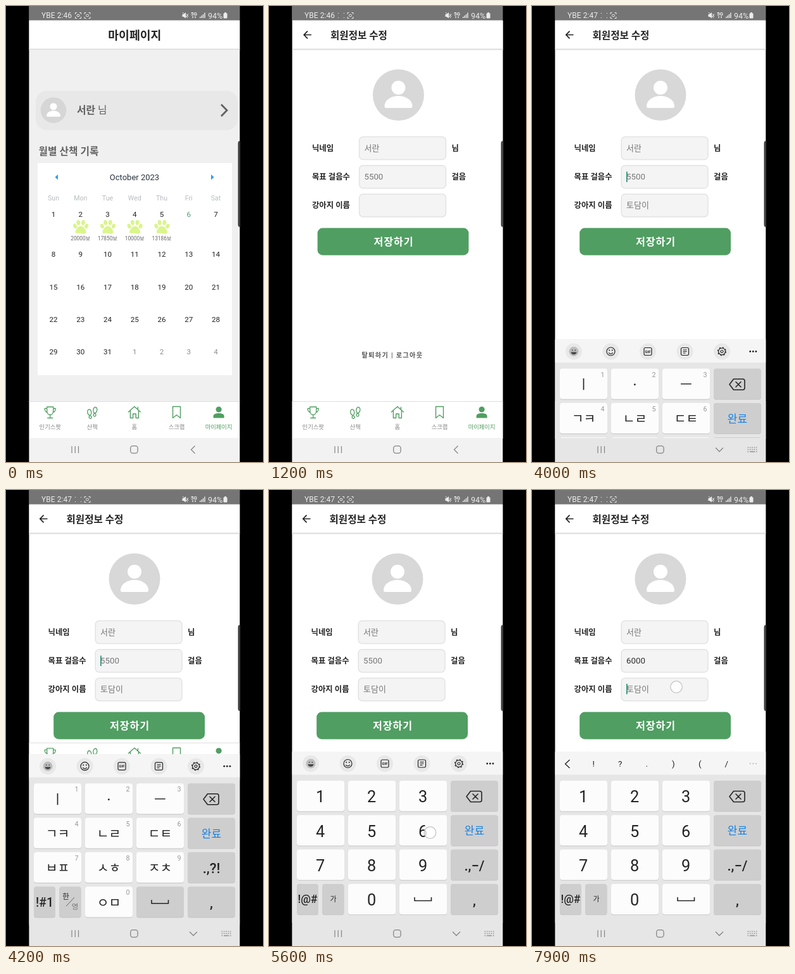
These frames come from a looping animation (406 by 720 pixels, 8000 ms). An HTML page:

```html
<!DOCTYPE html>
<html lang="ko">
<head>
<meta charset="utf-8">
<title>My page</title>
<style>
html, body { margin: 0; width: 100%; height: 100%; overflow: hidden; background: #000; }
svg { display: block; width: 100vw; height: 100vh; }
text { font-family: Roboto, "Noto Sans CJK KR", "Noto Sans CJK", sans-serif; white-space: pre; }
</style>
</head>
<body>
<svg id="stage" viewBox="0 0 406 720" lang="ko"></svg>
<script>
const GREEN = '#509e62', INK = '#242424';
const LOOP = 8000;

// Markup helpers; text y is the vertical centre of the glyphs
const text = (s, x, y, size, fill = INK, more = '') =>
  `<text x="${x}" y="${(y + size * 0.36).toFixed(2)}" font-size="${size}" fill="${fill}" ${more}>${s}</text>`;
const mid = (s, x, y, size, fill, more = '') => text(s, x, y, size, fill, 'text-anchor="middle" ' + more);
const bold = 'font-weight="700"', medium = 'font-weight="500"';
const rect = (x, y, w, h, fill, r = 0, more = '') =>
  `<rect x="${x}" y="${y}" width="${w}" height="${h}" rx="${r}" fill="${fill}" ${more}/>`;
const band = (y, h, fill, more = '') => rect(36.4, y, 333, h, fill, 0, more);
const line = (d, stroke, w = 1.5, more = '') =>
  `<path d="${d}" fill="none" stroke="${stroke}" stroke-width="${w}" ${more}/>`;
const fill = (d, color) => `<path d="${d}" fill="${color}"/>`;
const dot = (x, y, r, color, more = '') => `<circle cx="${x}" cy="${y}" r="${r}" fill="${color}" ${more}/>`;
const group = (id, body) => `<g id="${id}">${body}</g>`;
const at = (x, y, body, k = 1) => `<g transform="translate(${x} ${y}) scale(${k})">${body}</g>`;
const round = 'stroke-linecap="round" stroke-linejoin="round"';

const person = dot(0, -11.5, 11, '#fff') +
  fill('M-22 18C-22 7-10 1.500 0 1.500S22 7 22 18Q22 20.500 19 20.500H-19Q-22 20.500-22 18Z', '#fff');

function header(title, back) {
  const name = back ? text(title, 95.5, 46, 15.6, INK, bold) : mid(title, 203.3, 46, 18.3, INK, bold);
  const arrow = back ? line('M65.500 45.500H54M59.500 39.700L53.800 45.500L59.500 51.300', '#222', 1.7) : '';
  return band(23, 45, '#fff') + band(67, 1, '#ececec') + band(68, 1, '#dcdcdc') + band(69, 1, '#eee') + name + arrow;
}

function paw(x, y) {
  const toe = (dx, dy, tilt) =>
    `<ellipse cx="${dx}" cy="${dy}" rx="2.900" ry="3.900" transform="rotate(${tilt} ${dx} ${dy})"/>`;
  return at(x, y, `<g fill="#daf58c">${toe(-9, -1.5, -22)}${toe(-3.8, -7, -6)}${toe(3.8, -7, 6)}${toe(9, -1.5, 22)}` +
    '<path d="M0-1.500C4-1.500 8.500 4.500 8.500 8C8.500 11.500 4 11 0 10S-8.500 11.500-8.500 8C-8.500 4.500-4-1.500 0-1.500Z"/></g>');
}

function calendar() {
  const colX = i => 75 + i * 42.75;
  const rowY = [329, 392, 443.5, 495, 546];
  let out = rect(50, 248, 307, 335, '#fff') + mid('October 2023', 203, 270.3, 13, '#2b3440') +
    fill('M82 266V274.500L77.500 270.200Z', '#2a9fe8') + fill('M324 266V274.500L328.500 270.200Z', '#2a9fe8');
  ['Sun', 'Mon', 'Tue', 'Wed', 'Thu', 'Fri', 'Sat'].forEach((d, i) => {
    out += mid(d, colX(i), 302.8, 10.6, '#b8bcc0');
  });
  for (let i = 0; i < 35; i++) {
    const next = i > 30, color = next ? '#8e8e8e' : i === 5 ? '#4d9e6c' : INK;
    out += mid(next ? i - 30 : i + 1, colX(i % 7), rowY[Math.floor(i / 7)], 11.6, color);
  }
  [20000, 17850, 10000, 13186].forEach((n, i) => {
    out += paw(colX(i + 1) + 0.4, 349) + mid(n + '보', colX(i + 1), 367.3, 8.3, '#666');
  });
  return out;
}

function myPage() {
  const card = rect(47, 134, 319, 62, '#e8e8e8', 17) + dot(75, 164.5, 20.3, '#d6d6d6') + at(75, 164.5, person, 0.5) +
    text(`<tspan ${bold}>서란</tspan> 님`, 112, 164.5, 15.8, '#606060') +
    line('M340 155.500L349 164.700L340 174', '#626262', 2.8);
  return band(23, 602, '#f0f0f0') + header('마이페이지') + group('card', card) +
    text('월별 산책 기록', 51.5, 229.5, 15.8, '#646464', bold) + calendar();
}

function editPage() {
  let out = band(23, 660, '#fff') + header('회원정보 수정', true) +
    dot(203, 140.5, 40.5, '#d8d8d8') + at(203, 140.5, person);
  [['닉네임', '님'], ['목표 걸음수', '걸음'], ['강아지 이름', '']].forEach(([label, unit], i) => {
    const y = 224.5 + i * 45.2;
    out += text(label, 66.5, y, 12.4, INK, bold) + text(unit, 287, y, 12.4, INK, bold) +
      rect(141.2, y - 18, 136.8, 36, '#f4f4f4', 6, 'stroke="#e3e3e3" stroke-width="1.500"');
  });
  return out + text('서란', 149, 224.5, 13, '#777') +
    text('5500', 149, 269.7, 13.3, '#777', 'id="steps"') +
    text('토담이', 149, 314.7, 13, '#777', 'id="dog"') +
    rect(149, 261.5, 1.7, 16.5, '#2b8f74', 0, 'id="caret"') +
    rect(75.2, 350.6, 238.8, 42.8, GREEN, 8) + mid('저장하기', 195.5, 372.5, 16.2, '#fff', bold + ' letter-spacing=".8"') +
    text('탈퇴하기 | 로그아웃', 145, 551, 10.2, '#555', bold + ' letter-spacing="1.300"');
}

function tabBar() {
  const icons = [
    line('M-5-8.500H5V-2C5 2 2.500 4 0 4S-5 2-5-2ZM-5-6H-8.500C-8.500-2-7-.5-4.500 0M5-6H8.500C8.500-2 7-.5 4.500 0M0 4V8.500M-4 9H4', GREEN, 1.3, round),
    [[-4.5, 0, -8], [4.5, -3.5, 8]].map(([x, y, tilt]) =>
      `<g transform="translate(${x} ${y}) rotate(${tilt})" fill="none" stroke="${GREEN}" stroke-width="1.300">` +
      '<ellipse rx="3" ry="4.600"/><ellipse cx=".3" cy="7.800" rx="2" ry="2.100"/></g>').join(''),
    line('M-9.500-.5L0-9L9.500-.5M-6.500-3V9H-2.300V2.500H2.300V9H6.500V-3M5.500-4.500V-8', GREEN, 1.4, round),
    line('M-6-9H6V9L0 4.300L-6 9Z', GREEN, 1.4, round),
    dot(0, -4.5, 4.6, GREEN) + fill('M-8.500 9V6C-8.500 2.500-4 1.500 0 1.500S8.500 2.500 8.500 6V9Z', GREEN)
  ];
  return band(624, 59, '#fff') + band(624, 1, '#dedede') +
    ['인기스팟', '산책', '홈', '스크랩', '마이페이지'].map((name, i) => {
      const x = 69.7 + i * 66.6;
      return at(x, 641.5, icons[i]) + mid(name, x, 665, 9.3, i === 4 ? GREEN : '#858585');
    }).join('');
}

const colX = [44, 125, 206, 287], rowY = [459, 513.3, 567.6, 622];
function key(x, y, w, grey, label = '') {
  return rect(x, y + 1, w, 48.2, '#c6c6c6', 4) + rect(x, y, w, 48.2, grey ? '#cecece' : '#fcfcfc', 4) + label;
}

function sharedKeys(punct) {
  const erase = line('M318.500 475.500H333Q336 475.500 336 478.500V489.500Q336 492.500 333 492.500H318.500L312 484ZM322 480L330 488M330 480L322 488', INK, 1.6, round);
  return key(287, rowY[0], 75, true, erase) +
    key(287, rowY[1], 75, true, mid('완료', 324.5, 538.3, 17, '#1681e8')) +
    key(287, rowY[2], 75, true, mid(punct, 324.5, 593, 22, INK, medium)) +
    key(287, rowY[3], 75, true, mid(',', 324.5, 648, 22, INK, medium));
}

const space = line('M230 643V648.500H256.500V643', INK, 1.6);

function hangulKeys() {
  const jamo = (s, x, y, n) => key(x, y, 75, false,
    mid(s, x + 37.5, y + 25, 20.5, INK, medium) + mid(n, x + 67.5, y + 9.2, 10.8, '#999'));
  const labels = ['ㅣ', '·', 'ㅡ', 'ㄱㅋ', 'ㄴㄹ', 'ㄷㅌ', 'ㅂㅍ', 'ㅅㅎ', 'ㅈㅊ'];
  return labels.map((s, i) => jamo(s, colX[i % 3], rowY[Math.floor(i / 3)], i + 1)).join('') +
    key(44, rowY[3], 34, true, mid('!#1', 61, 646.5, 19.5, INK, medium)) +
    key(84, rowY[3], 34.5, true, mid('한', 94.5, 637.5, 11.5, INK) + mid('영', 109, 654, 11.5, '#777') + line('M95 653L108 639', '#666', 1)) +
    jamo('ㅇㅁ', 125, rowY[3], 0) + key(206, rowY[3], 75, true, space) + sharedKeys('.,?!');
}

function numberKeys() {
  let out = '';
  for (let i = 0; i < 9; i++) {
    const x = colX[i % 3], y = rowY[Math.floor(i / 3)];
    out += key(x, y, 75, false, mid(i + 1, x + 37.2, y + 25.3, 25.3, INK));
  }
  return out + key(44, rowY[3], 34, true, mid('!@#', 61, 646, 17.5, INK, medium)) +
    key(84, rowY[3], 34.5, true, mid('가', 101.5, 646, 11, INK)) +
    key(125, rowY[3], 75, false, mid('0', 162.2, 647, 25.3, INK)) +
    key(206, rowY[3], 75, false, space) + sharedKeys('.,−/');
}

function tools() {
  const ring = (r, more = '') => dot(0, 0, r, 'none', `stroke="${INK}" stroke-width="1.200" ${more}`);
  const box = rect(-6, -6, 12, 12, 'none', 2, `stroke="${INK}" stroke-width="1.200"`);
  const eyes = color => dot(-2.3, -2, 1, color) + dot(2.3, -2, 1, color);
  const icons = [
    dot(0, 0, 7.5, '#bcbcbc') + eyes('#555') + fill('M-4.500 1H4.500C4 6-4 6-4.500 1Z', '#444'),
    ring(6.5) + eyes(INK) + line('M-3.300 1.800C-2 4.500 2 4.500 3.300 1.800', INK, 1.2),
    box + mid('GIF', 0, 0, 5.8, INK, bold),
    box + line('M-3-2.500H3M-3 0H3M-3 2.500H1', INK, 1),
    ring(5.4) + ring(6.5, 'stroke-dasharray="2.200 2.905"') + ring(2)
  ];
  return icons.map((icon, i) => at(66 + i * 58.5, 432, dot(0, 0, 13, '#e8e8e8') + icon)).join('') +
    [344.7, 349.3, 353.9].map(x => dot(x, 432, 1.4, INK)).join('');
}

function symbols() {
  return line('M59.500 426L52.500 432.500L59.500 439', INK, 1.4) +
    [...'!?.)(/'].map((s, i) => mid(s, 97.3 + i * 42, 432.5, 13.5, INK)).join('') +
    [344.7, 349.3, 353.9].map(x => dot(x, 432, 1, '#b5b5b5')).join('');
}

function keyboard() {
  return band(413, 270, '#e6e6e6') + band(413, 36.5, '#f5f5f5') +
    group('tools', tools()) + group('symbols', symbols()) +
    group('hangul', hangulKeys()) + group('numbers', numberKeys());
}

function navBar() {
  const keys = line('M340.500 697H355.500M340.500 700.300H355.500', '#999', 1.6, 'stroke-dasharray="1.700 1.600"') +
    line('M340.500 703.600H342.200M344 703.600H352M353.700 703.600H355.500', '#999', 1.6);
  return band(682, 38, '#f2f2f2', 'id="navBg"') +
    line('M104 695V706M109.200 695V706M114.500 695V706', '#858585', 1.2) +
    rect(196.7, 694.7, 11.4, 11.4, 'none', 3.5, 'stroke="#858585" stroke-width="1.300"') +
    group('navBack', line('M298.500 694.500L292.500 700.500L298.500 706.500', '#858585', 1.3)) +
    group('navDown', line('M290 697.500L296 703.500L302 697.500', '#858585', 1.3) + keys);
}

function statusBar() {
  const white = '#ececec';
  const corners = 'M-4.500-2V-4.500H-2M2-4.500H4.500V-2M4.500 2V4.500H2M-2 4.500H-4.500V2';
  const scan = line(corners, white, 1) + rect(-2, -1.5, 4, 3, 'none', 1, `stroke="${white}"`);
  const faint = line('M-4.500-4V-3M4.500-4V-3M4.500 3V4M-4.500 3V4', white, 1.2);
  const bars = [2, 4, 6, 8.5].map((h, i) => rect(306 + i * 2.4, 19 - h, 1.4, h, white)).join('');
  return band(0, 22.6, '#757575') + text('YBE', 56, 15, 12, white) + text('2:46', 80.8, 15, 12, white, 'id="clock"') +
    group('scan', at(114, 15, scan)) + group('faint', at(114, 15, faint)) + at(128.5, 15, scan) +
    fill('M278.500 13H280.500L284 10V19.500L280.500 17H278.500Z', white) + line('M285 12.500L288 17M288 12.500L285 17M279 10L287 19', white, 1) +
    mid('5G', 297, 12, 8, white, bold) + line('M295 16V19M299 16V19', white, 1.3) + bars +
    text('94%', 319, 15, 12.5, white) + rect(343.5, 11.5, 6, 8, white, 1) + rect(345.2, 10, 2.6, 2, white);
}

document.getElementById('stage').innerHTML =
  `<clipPath id="screen">${band(0, 720, '#fff')}</clipPath>` + rect(0, 0, 406, 720, '#000') +
  '<g clip-path="url(#screen)">' + band(0, 720, '#fff') +
  group('home', myPage()) + group('edit', editPage()) + group('tabs', tabBar()) +
  group('keyboard', keyboard()) + navBar() + statusBar() + '</g>' +
  fill('M369.500 213Q366.500 213 366.500 217V345Q366.500 349 369.500 349Z', '#3c3c3c') +
  dot(0, 0, 9.3, '#fff', 'id="touch" fill-opacity=".8" stroke="#c6c6c6" stroke-width="1.300"');

const el = {};
document.querySelectorAll('[id]').forEach(node => { el[node.id] = node; });
const show = (name, on) => el[name].setAttribute('display', on ? 'inline' : 'none');
const move = (name, x, y) => el[name].setAttribute('transform', `translate(${x.toFixed(2)} ${y.toFixed(2)})`);
const span = (t, from, ms) => Math.min(1, Math.max(0, (t - from) / ms));
const easeInOut = p => p < 0.5 ? 2 * p * p : 1 - 2 * (1 - p) * (1 - p);
const easeOut = p => 1 - (1 - p) ** 3;

// Critically damped spring, progress from 0 to 1
function spring(t, from) {
  const u = Math.max(0, t - from) * 0.01826;
  return u > 10 ? 1 : 1 - (1 + u) * Math.exp(-u);
}

// Each tap: start, end, x, y
const taps = [
  [600, 740, 245, 167], [3800, 3950, 215, 271], [4970, 5120, 62, 648], [5560, 5720, 254.5, 541],
  [6300, 6420, 176.5, 646], [6580, 6720, 176.5, 646], [6860, 7000, 176.5, 646], [7680, 8000, 228, 311]
];
const typing = [[5700, '6'], [6400, '60'], [6660, '600'], [6960, '6000']];
const dimIcon = [[900, 1800], [2800, 4650], [7200, 8000]];

function draw(t) {
  const slide = spring(t, 784);
  move('home', -100 * slide, 0);
  show('home', slide < 0.99);
  move('edit', 333 * (1 - slide), 0);
  show('edit', t > 784);
  el.card.setAttribute('opacity', t >= 600 && t < 900 ? 0.6 : 1);
  show('dog', t >= 1500);

  const rise = easeOut(span(t, 3900, 400)), hide = easeInOut(span(t, 4035, 250));
  show('keyboard', rise > 0);
  move('keyboard', 0, 269 * (1 - rise));
  move('tabs', 0, t < 4035 ? 0 : -269 + 57 * hide);
  show('tabs', hide < 1);
  el.navBg.setAttribute('fill', rise > 0 ? '#e6e6e6' : '#f2f2f2');
  show('navBack', rise === 0);
  show('navDown', rise > 0);

  const numeric = t >= 5100, typed = typing.filter(([from]) => t >= from).pop();
  show('hangul', !numeric);
  show('numbers', numeric);
  show('tools', !typed);
  show('symbols', !!typed);
  el.steps.textContent = typed ? typed[1] : '5500';
  el.steps.setAttribute('fill', typed ? '#2e2e2e' : '#777');

  const onDog = t >= 7800;
  const blink = !!typed || (t - 3950) % 1000 < 500;
  show('caret', t >= 3950 && blink);
  el.caret.setAttribute('x', 149 + (typed && !onDog ? typed[1].length * 7.46 - 0.2 : 0));
  el.caret.setAttribute('y', onDog ? 306 : 261.5);

  el.clock.textContent = t < 3600 ? '2:46' : '2:47';
  const dim = dimIcon.some(([a, b]) => t >= a && t < b);
  show('scan', !dim);
  show('faint', dim);

  const tap = taps.find(([a, b]) => t >= a && t < b);
  show('touch', !!tap);
  if (tap) move('touch', tap[2], tap[3]);
}

let began;
function tick(now) {
  began ??= now;
  draw((now - began) % LOOP);
  requestAnimationFrame(tick);
}
draw(0);
requestAnimationFrame(tick);
</script>
</body>
</html>
```
